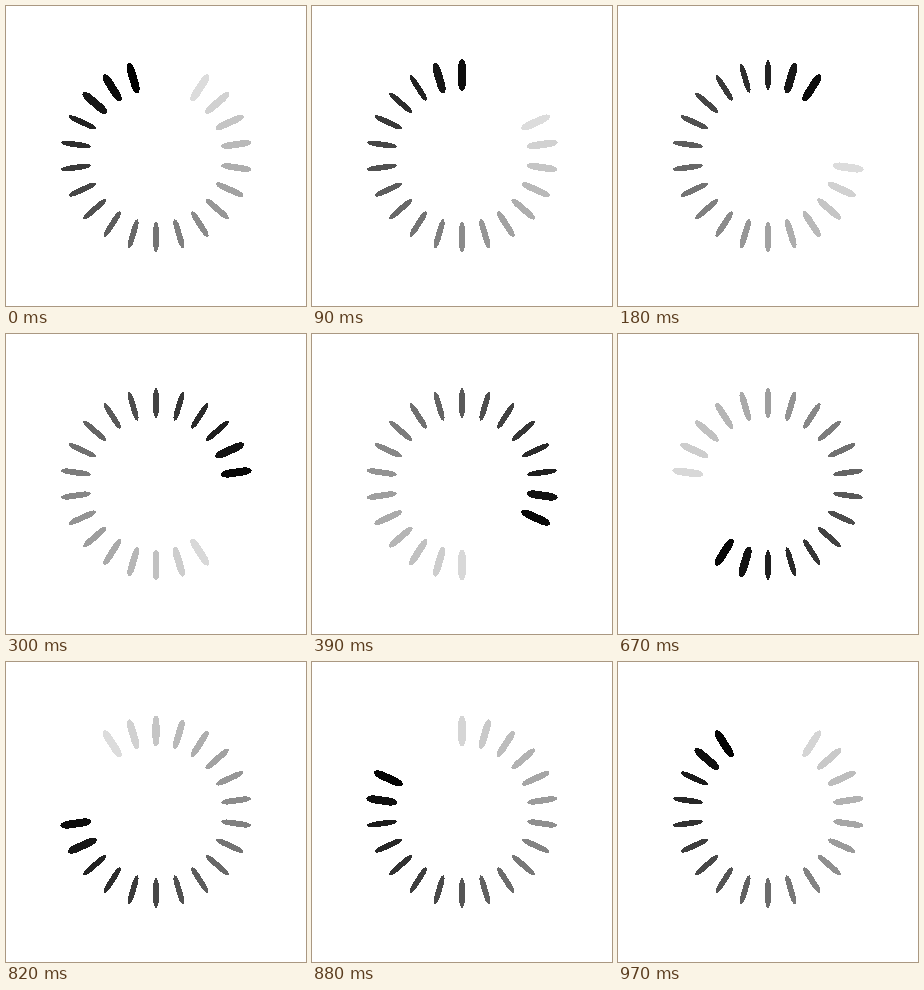
These frames come from a looping animation (300 by 300 pixels, 1 s). An HTML page:

```html
<!DOCTYPE html>
<html lang="en">
<head>
<meta charset="utf-8">
<title>Spinner</title>
<style>
  html, body { margin: 0; width: 100%; height: 100%; overflow: hidden; background: #fff; }
  svg { display: block; width: 100%; height: 100%; }
</style>
</head>
<body>
<svg id="stage" viewBox="0 0 300 300" shape-rendering="crispEdges"></svg>
<script>
const BARS = 22, STEPS = 33, LOOP = 1000;
const CYCLE = BARS * 3; // three ticks per bar, two per step
const NS = "http://www.w3.org/2000/svg";
const stage = document.getElementById("stage");

const bars = Array.from({ length: BARS }, (_, i) => {
  const bar = document.createElementNS(NS, "rect");
  bar.setAttribute("transform", `rotate(${i * 360 / BARS} 150 150)`);
  stage.append(bar);
  return bar;
});

// Fresh bars are bold, then turn thin and widen as they fade.
function barWidth(level) {
  return level > 0.9 ? 8 : 5.6 + 4 * (1 - level) ** 4;
}

function drawBar(bar, i, step) {
  const age = (2 * step - 3 * (i + 1) + 2 * CYCLE) % CYCLE;
  const level = 1 - age / CYCLE;
  const visible = level > 0.13 && (age > 0 || step === 0);
  bar.style.display = visible ? "" : "none";
  if (!visible) return;
  const width = barWidth(level);
  const length = 26 + 0.7 * width;
  const gray = Math.round(255 * (1 - level));
  const shape = {
    x: 150 - width / 2, y: 69 - length / 2, width, height: length,
    rx: width / 2, ry: 9, fill: `rgb(${gray},${gray},${gray})`
  };
  for (const key in shape) bar.setAttribute(key, shape[key]);
}

function stepAt(ms) {
  return Math.floor((Math.floor(ms / 10) + 0.5) * 10 * STEPS / LOOP);
}

let start = null, last = -1;
function render(now) {
  if (start === null) start = now;
  const step = stepAt((now - start) % LOOP);
  if (step !== last) {
    bars.forEach((bar, i) => drawBar(bar, i, step));
    last = step;
  }
  requestAnimationFrame(render);
}
bars.forEach((bar, i) => drawBar(bar, i, 0));
requestAnimationFrame(render);
</script>
</body>
</html>
```
